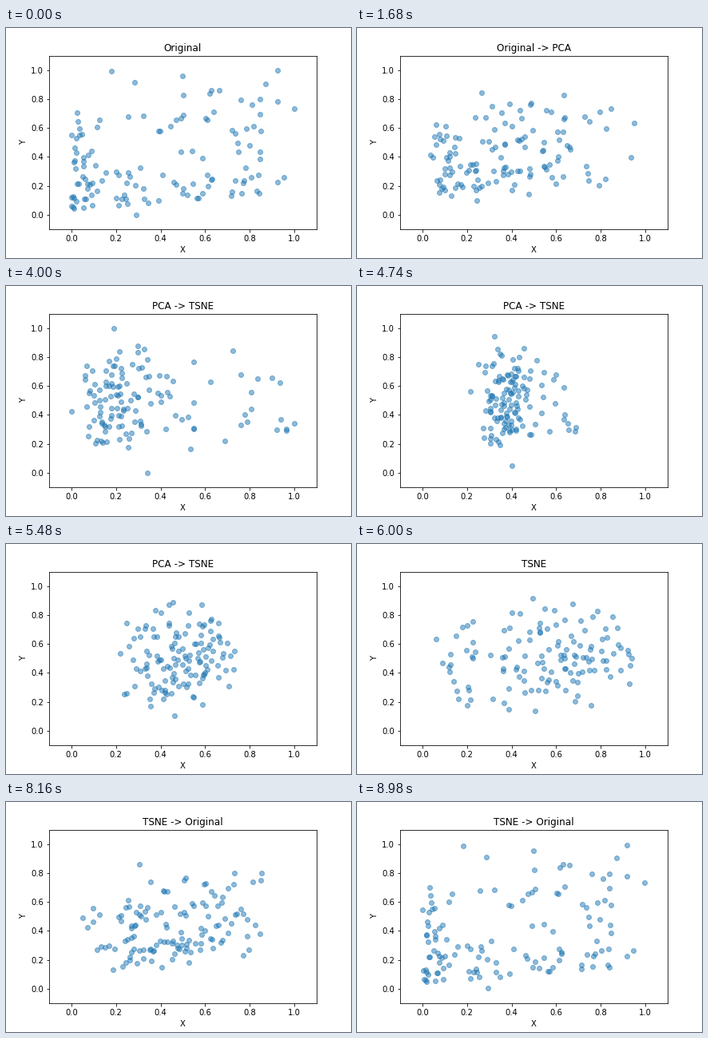
Animation, 432 px wide and 288 px high, one loop 9 s. Source, as a matplotlib script:

```python
import matplotlib.pyplot as plt
import numpy as np
from matplotlib.animation import FuncAnimation

COUNT = 127
HOLD, MOVE = 50, 100
PHASE = HOLD + MOVE
NAMES = ["Original", "PCA", "TSNE"]

# Outliers that shape the outline: x, y in the first layout, then x, y under PCA
OUTLIERS = np.array([
    (.18, .99, .43, .555),
    (.285, .915, .14, .21),
    (.5, .96, .18, .395),
    (.925, 1, .69, .22),
    (.925, .785, 1, .34),
    (1, .735, .395, .67),
    (.955, .26, .9, .655),
    (.925, .225, .535, .165),
    (.62, .84, .94, .37),
    (.72, .16, .76, .68),
    (.63, .25, .725, .845),
    (.025, .705, .115, .225),
    (.545, .215, .34, 0),
    (.09, .135, .19, 1),
    (.29, 0, .15, .285),
    (.255, .29, 0, .425),
])


def spread_original(rng, n):
    """Crowded toward the lower left, thin toward the upper right."""
    u, w = rng.random((2, n))
    return np.column_stack([.93 * u ** 1.7,
                            .04 + .9 * (.25 * u + .75 * w) ** 1.6])


def spread_pca(rng, n):
    """A dense column at the left and a loose group at the right."""
    x = np.minimum(rng.lognormal(np.log(.2), .5, n), .55)
    y = .1 + .83 * rng.beta(2.3, 2.5, n)
    loose = n // 10
    x[:loose] = rng.uniform(.6, .98, loose)
    y[:loose] = rng.uniform(.22, .68, loose)
    return np.column_stack([x, y])


def spread_tsne(rng, pca):
    """A round cloud: PCA x runs backward, PCA y is roughly kept."""
    across = np.log(pca[:, 0].clip(.04) / .2) / .55
    upward = (pca[:, 1] - .48) / .2
    noise = rng.normal(0, .6, (len(pca), 2))
    offset = np.column_stack([.45 - .8 * across, .75 * upward]) + noise
    offset *= .44
    radius = np.hypot(*offset.T)
    squash = (1 + radius ** 4) ** -.25
    return .5 + .5 * offset * squash[:, None]


def build_layouts():
    rng = np.random.default_rng(12)
    n = COUNT - len(OUTLIERS)
    first = np.vstack([OUTLIERS[:, :2], spread_original(rng, n)])
    second = np.vstack([OUTLIERS[:, 2:], spread_pca(rng, n)])
    return [first, second, spread_tsne(rng, second)]


layouts = build_layouts()

fig, ax = plt.subplots(figsize=(6, 4), dpi=72)
fig.subplots_adjust(bottom=.125)
ax.set(xlim=(-.1, 1.1), ylim=(-.1, 1.1), xlabel="X", ylabel="Y")
dots = ax.scatter(*layouts[0].T, alpha=.5)
title = ax.set_title(NAMES[0])


def update(frame):
    here, step = divmod(frame, PHASE)
    there = (here + 1) % len(layouts)
    t = max(step - HOLD, 0) / MOVE
    dots.set_offsets((1 - t) * layouts[here] + t * layouts[there])
    moving = step >= HOLD
    title.set_text(f"{NAMES[here]} -> {NAMES[there]}" if moving else NAMES[here])
    return dots, title


anim = FuncAnimation(fig, update, frames=len(layouts) * PHASE, interval=20,
                     repeat=True, repeat_delay=0, blit=False)
plt.show()
```
